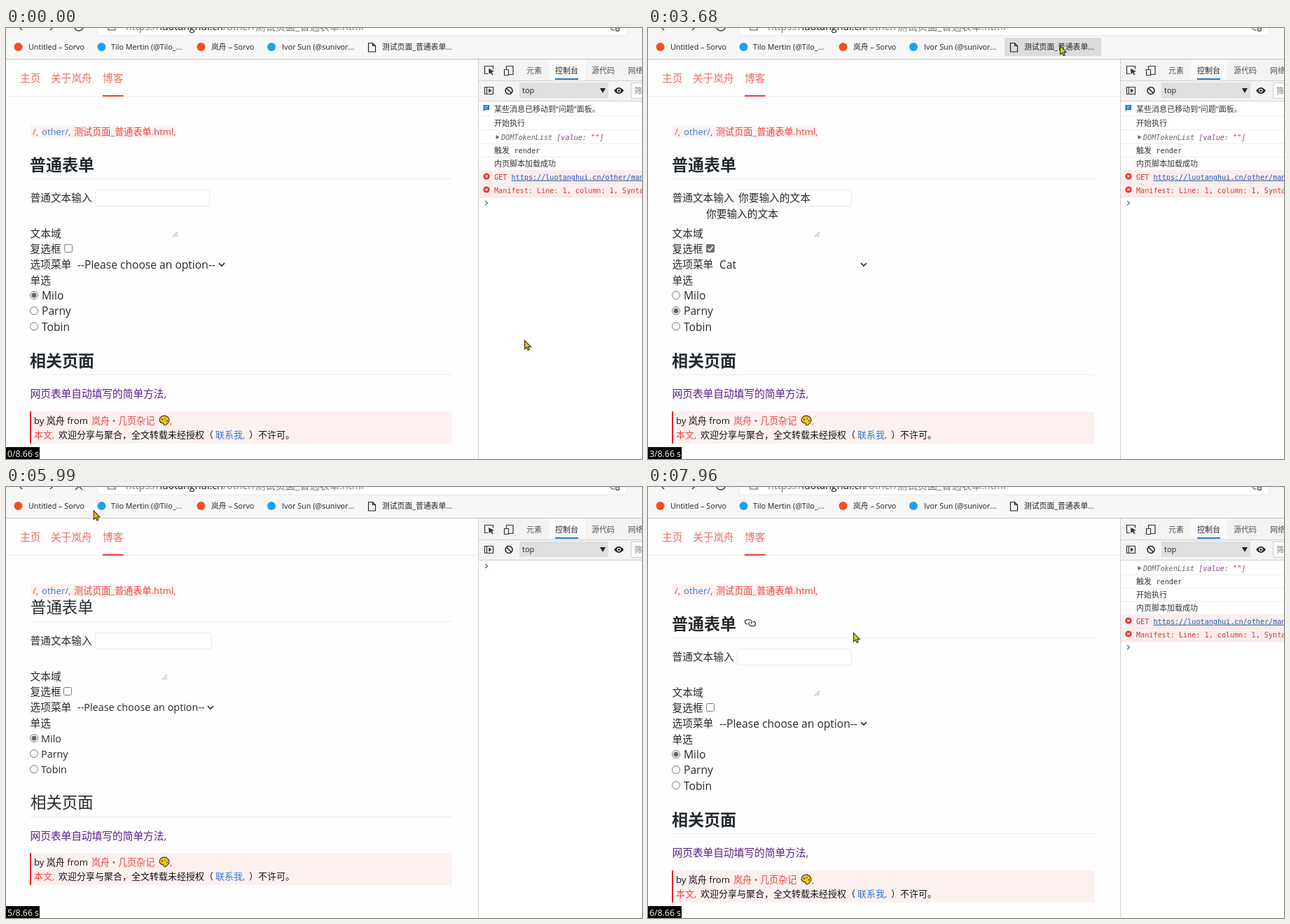
These frames come from a looping animation (908x616 px, 7.99 s). An HTML page:

```html
<!DOCTYPE html>
<html lang="zh-CN">
<head>
<meta charset="utf-8">
<title>表单自动填写</title>
<style>
html, body { margin: 0; width: 100%; height: 100%; overflow: hidden; background: #fff; }
svg { display: block; width: 908px; height: 616px; font-family: "Open Sans", "Noto Sans CJK SC", "Noto Sans CJK", sans-serif; }
text { white-space: pre; }
.mono { font-family: "DejaVu Sans Mono", "Noto Sans CJK SC", "Noto Sans CJK", monospace; }
</style>
</head>
<body>
<svg id="stage" viewBox="0 0 908 616" xmlns="http://www.w3.org/2000/svg"></svg>
<script>
const LOOP = 7990;
const INK = '#24292e', RED = '#e5463f', SOFT_RED = '#ec6c66', BLUE = '#2f7bd0', PURPLE = '#5a2188', RULE = '#eaecef';
const SITE = 'luotanghui.cn', AUTHOR = '岚舟';

// Shape helpers; text is placed by its vertical centre.
const text = (x, cy, size, fill, str, attrs = '') =>
  `<text x="${x}" y="${cy + size * 0.37}" font-size="${size}" fill="${fill}" ${attrs}>${str}</text>`;
const mono = (x, cy, fill, str, attrs = '') => text(x, cy, 10.15, fill, str, `class="mono" ${attrs}`);
const rect = (x, y, w, h, fill, attrs = '') =>
  `<rect x="${x}" y="${y}" width="${w}" height="${h}" fill="${fill}" ${attrs}/>`;
const circle = (x, y, r, fill, attrs = '') => `<circle cx="${x}" cy="${y}" r="${r}" fill="${fill}" ${attrs}/>`;
const line = (d, stroke, width = 1, attrs = '') =>
  `<path d="${d}" fill="none" stroke="${stroke}" stroke-width="${width}" ${attrs}/>`;
const group = (id, body, attrs = '') => `<g id="${id}" ${attrs}>${body}</g>`;

function browserBar() {
  const label = (x, str) => text(x, 27, 10.8, '#222', str);
  return rect(0, 0, 908, 44, '#f7f7f7') + line('M0 44.5H908', '#c4c4c4') +
    rect(130, -20, 757, 31, '#fff', 'rx="4" stroke="#e6e6e6"') +
    group('reloadHover', rect(86, -6, 37, 17, '#d9d9d9', 'rx="3"')) +
    group('tabHover', rect(509, 14, 138, 26, '#dcdcdc')) +
    line('M18 -2l5 5M63 3l5 -5', '#333', 1.3) +
    group('reloadIcon', line('M98 -1a6 5 0 0 0 12 0', '#333', 1.4)) +
    group('stopIcon', line('M99 4l5 -5l5 5', '#333', 1.3)) +
    line('M146 -2V3H156V-2', '#555', 1.2) +
    text(171, -2, 14.2, '#777', `https://<tspan fill="#111">${SITE}</tspan>/other/测试页面_普通表单.html`) +
    line('M863 0q2 4 6 3', '#666', 1.2) + circle(873, 2, 3.2, '#666') + line('M871 2h4M873 0v4', '#fff', 1) +
    circle(17.5, 27, 6, '#f24e1e') + label(32, 'Untitled – Sorvo') +
    circle(136.5, 27, 6, '#1da1f2') + label(150, 'Tilo Mertin (@Tilo_...') +
    circle(278.5, 27, 6, '#f24e1e') + label(293, `${AUTHOR} – Sorvo`) +
    circle(379, 27, 6, '#1da1f2') + label(394, 'Ivor Sun (@sunivor...') +
    line('M517.5 21.5h6l4 4v8.5h-10zM523.5 21.5v4h4', '#222', 1.2) + label(537, '测试页面_普通表单...');
}

function pageHeader() {
  const nav = (x, str) => text(x, 72, 14.7, SOFT_RED, str, 'font-weight="300"');
  return line('M0 97.5H674', '#eee') + nav(20, '主页') + nav(64, '关于' + AUTHOR) + nav(138, '博客') +
    rect(138, 96, 29.5, 2, '#e53b35') + rect(35, 139, 206, 18, '#fdf3f2') +
    text(38, 148, 13.1, RED, '/,') + text(51, 148, 13.1, BLUE, 'other/,') +
    text(97, 148, 13.1, RED, '测试页面_普通表单.html,');
}

const palette = (x, y) =>
  `<path d="M${x - 7} ${y}a7 6.5 0 1 1 10 5q-2 3 -4 0q0 -3 -3 -2z" fill="#f5c518" stroke="#2b2b2b" stroke-width="1.1"/>` +
  circle(x - 3, y - 2, 1, '#2b2b2b') + circle(x + 1, y - 3, 1, '#d33') + circle(x + 4, y, 1, '#2b2b2b');

function footer(y) {
  const a = y + 13.5, b = y + 33;
  return rect(34, y, 603, 46, '#fdf1f0') + rect(34, y, 2, 46, '#e0202a') +
    text(40, a, 13.1, '#111', `by ${AUTHOR} from`) + text(122, a, 13.1, RED, AUTHOR + ' • 几页杂记') +
    palette(226, a) + text(234, a, 13, RED, ',') +
    text(40, b, 13, RED, '本文,') + text(75, b, 13, '#111', '欢迎分享与聚合，全文转载未经授权（') +
    text(299, b, 13, BLUE, '联系我,') + text(347, b, 13, '#111', '）不许可。');
}

function radio(y, id) {
  return circle(40, y, 5.5, '#fff', 'stroke="#767676"') + group(id, circle(40, y, 3.5, '#686868'));
}

// Page body, either fully styled or as it looks before the style sheet arrives.
function pageBody(styled) {
  const dy = styled ? 0 : -23, latin = styled ? 15.6 : 14.4, key = styled ? 'S' : 'P';
  const label = (y, str) => text(34.5, y + dy, 14.7, INK, str);
  const heading = (y, str) => styled ? text(34, y, 23, INK, str, 'font-weight="700"')
    : text(35, y, 22.4, INK, str);
  const rule = y => line(`M34 ${y}H637`, RULE);
  const gap = styled ? 0 : -24;
  const boxX = styled ? 83.5 : 82.5, boxY = 309.5 + dy;
  const endX = styled ? 308 : 292, grip = styled ? 242 : 227;
  const choices = ['Milo', 'Parny', 'Tobin'].map((name, i) =>
    radio(382 + dy + i * 22.2, key + i) + text(styled ? 51 : 50, 382.5 + dy + i * 22.2, latin, INK, name)).join('');
  return heading(195 + dy, '普通表单') + rule(215.5 + dy) +
    label(243, '普通文本输入') + rect(127.5, 231.5 + dy, styled ? 163 : 166, 23, '#fff', 'rx="2" stroke="#e6eaef"') +
    label(293.5, '文本域') + line(`M${grip - 4} ${298.5 + dy}l7 -7m0 4l-3 3`, '#777', 0.9) +
    label(315.5, '复选框') + rect(boxX, boxY, 11, 11, '#fff', 'rx="2" stroke="#767676"') +
    label(338, '选项菜单') + group(key + 'Prompt', text(102, 338 + dy, latin, INK, '--Please choose an option--')) +
    line(`M${endX - 4} ${336 + dy}l4 4l4 -4`, '#222', 1.6) +
    label(360.5, '单选') + choices +
    heading(475 + gap, '相关页面') + rule(495.5 + gap) +
    text(34.5, 522.5 + gap, 14.7, PURPLE, '网页表单自动填写的简单方法,') + footer(styled ? 548 : 523);
}

function filledFields() {
  return text(129, 243, 14.7, INK, '你要输入的文本') + text(83, 266, 14.7, INK, '你要输入的文本') +
    rect(83, 309, 12, 12, '#707070', 'rx="2"') + line('M85.5 315l2.7 3l4.5 -6', '#fff', 1.6) +
    text(102, 338, 15.6, INK, 'Cat');
}

const anchorIcon = line('M142.5 196h-1.2a2.8 3.1 0 0 1 0 -6.2h4a2.8 3.1 0 0 1 1.6 5.6' +
  'M149.5 192.4h1.2a2.8 3.1 0 0 1 0 6.2h-4a2.8 3.1 0 0 1 -1.6 -5.6', INK, 1.1);

function devtoolsFrame() {
  const tab = (x, str, fill = '#555') => text(x, 61, 11, fill, str);
  return rect(674, 45, 234, 571, '#fff') + rect(674, 45, 234, 59, '#f3f3f3') +
    rect(775, 46, 52, 29, '#fafafa') + line('M674.5 45V616M674 75.5H908M674 104.5H908', '#cfcfcf') +
    line('M688 65.5h-4.5v-11h12v4', '#333', 1.2) + '<path d="M689 58l8 4l-3.5 1l2 3.5l-1.5 .8l-2 -3.4l-2.5 2z" fill="#333"/>' +
    line('M714.5 59v-4.5h9.5v12h-6M711.5 59.5h6v8h-6z', '#333', 1.2) +
    tab(743, '元素') + tab(784, '控制台', '#222') + tab(836, '源代码') + tab(888, '网络') +
    rect(784, 72, 33, 2, '#1a73c8') +
    line('M683.5 84.5h12v10h-12zM686.5 84.5v10', '#333', 1.2) + '<path d="M689 86.5l4.5 3l-4.5 3z" fill="#333"/>' +
    circle(718, 89.5, 5, 'none', 'stroke="#222" stroke-width="1.5"') + line('M714.5 86l7 7', '#222', 1.5) +
    rect(733, 78, 127, 22, '#dfdfdf') + text(737, 89, 11, '#222', 'top') +
    '<path d="M848 86h8l-4 7z" fill="#222"/>' +
    '<path d="M868 89.5q7 -9 14 0q-7 9 -14 0z" fill="#222"/>' +
    circle(875, 89.5, 2.8, '#f3f3f3') + circle(875, 89.5, 1.5, '#222') +
    rect(892.5, 78.5, 30, 22, '#fff', 'stroke="#ccc"') + text(897, 89.5, 11, '#777', '筛');
}

const arrow = y => `<path d="M699.5 ${y - 3}l5 3l-5 3z" fill="#666"/>`;
const plain = str => y => text(697, y, 11, '#333', str, 'class="mono"');
const failure = body => y => rect(675, y - 9.5, 233, 19, '#fdeeee') +
  circle(686, y - 1, 4.6, '#e0362f') + line(`M684.3 ${y - 2.7}l3.4 3.4m0 -3.4l-3.4 3.4`, '#fff', 1.1) + body(y);

const ROWS = {
  notice: y => '<path d="M681.5 ' + (y - 6) + 'h8.5v7h-6l-2.5 2.5z" fill="#1a78d0"/>' +
    line(`M683.5 ${y - 3.7}h4.5m-4.5 2.2h3`, '#fff', 0.8) + text(697, y, 11, '#333', '某些消息已移动到“问题”面板。'),
  start: plain('开始执行'),
  tokens: y => arrow(y) + mono(707, y, '#666',
    'DOMTokenList [<tspan fill="#8a3a8a">value</tspan>: <tspan fill="#a03030">""</tspan>]', 'font-style="italic"'),
  render: y => text(697, y, 11, '#333', '触发', 'class="mono"') + mono(725.5, y, '#333', 'render'),
  loaded: plain('内页脚本加载成功'),
  get: failure(y => mono(697, y, '#d8322c', 'GET') +
    mono(721.5, y, '#2456b0', `https://${SITE}/other/manifest`, 'text-decoration="underline"')),
  manifest: failure(y => mono(697, y, '#d8322c', 'Manifest: Line: 1, column: 1, Syntax error.')),
  request: y => mono(697, y, '#333', '[<tspan font-size="11">请求地址</tspan>]') + arrow(y + 20) +
    mono(707.5, y + 14, '#666', `{<tspan fill="#8a3a8a">host</tspan>: <tspan fill="#333">"${SITE}"</tspan>, <tspan fill="#8a3a8a">path</tspan>: "/%E6"`, 'font-style="italic"') +
    mono(707.5, y + 27, '#666', '<tspan fill="#8a3a8a">s</tspan>: {…}}', 'font-style="italic"')
};

const FIRST = [['notice', 116], ['start', 136], ['tokens', 156], ['render', 175], ['loaded', 194], ['get', 213], ['manifest', 232]];
const SECOND = [['tokens', 116], ['render', 135], ['start', 154], ['loaded', 173], ['get', 192], ['manifest', 211]];

// Console contents by time: [from, rows, y of the prompt]
const CONSOLE = [
  [0, FIRST, 250],
  [4250, [...FIRST, ['request', 251]], 295],
  [5900, [], 113],
  [6370, SECOND.slice(0, 1), 134],
  [6540, SECOND.slice(0, 2), 153],
  [6800, SECOND.slice(0, 4), 191],
  [7600, SECOND, 229]
];

function consoleView(rows, promptY) {
  const body = rows.map(([kind, y]) => {
    const bottom = y + (kind === 'request' ? 35.5 : 9.5);
    const edge = kind === 'get' || kind === 'manifest' ? '#f8d9d9' : '#ededed';
    return ROWS[kind](y) + line(`M675 ${bottom}H908`, edge);
  }).join('');
  return body + line(`M684 ${promptY - 3}l3.5 3l-3.5 3`, '#3577d4', 1.4);
}

const POINTERS = {
  arrow: '<path d="M.5 .5V13L3.3 10.4L5.3 14.6L7.3 13.7L5.4 9.6H9.3Z" stroke="#333" stroke-width="1.1"/>',
  hand: '<path d="M4 9V1.5q1.2 -1.5 2.4 0V6l5 1.3v4.2l-1.2 4H4.5L.8 10.5l1 -2z" stroke="#333" stroke-width="1.2"/>' +
    line('M8 7v2.5M10 7.5v2', '#333', 0.8),
  beam: line('M0 1.2h7M3.5 1v12.5M0 13.3h7', '#333', 2.8) + line('M1 1.2h5M3.5 1v12.5M1 13.3h5', '#d9a400', 1)
};

const stage = document.getElementById('stage');
stage.innerHTML = rect(0, 0, 908, 616, '#fefefe') + pageHeader() +
  group('styled', pageBody(true) + group('filled', filledFields()) + group('anchor', anchorIcon)) +
  group('bare', pageBody(false)) + devtoolsFrame() +
  CONSOLE.map(([, rows, y], i) => group('console' + i, consoleView(rows, y))).join('') + browserBar() +
  rect(0, 599, 48, 17, '#000') + '<text id="clock" x="2" y="613" font-size="12.3" fill="#fff"></text>' +
  group('pointer', Object.entries(POINTERS).map(([id, shape]) => group(id, shape)).join(''));

const byId = id => document.getElementById(id);
const show = (id, on) => { byId(id).style.display = on ? '' : 'none'; };

// Pointer path: [time, x, y]
const PATH = [
  [0, 740, 446], [580, 740, 446], [1370, 587, 43], [1420, 587, 38], [1630, 588, 25], [4000, 588, 25],
  [4770, 102, 2], [4890, 101, 0], [5350, 101, 0], [5530, 102, 2], [5690, 102, 2], [6280, 146, 63],
  [6510, 146, 64], [7230, 58, 232], [7360, 69, 240], [7650, 190, 312], [7960, 293, 208], [LOOP, 293, 208]
];
const TICKS = [1150, 2130, 2880, 4030, 5180, 6600];

function pointerAt(t) {
  const i = Math.max(1, PATH.findIndex(p => p[0] > t));
  const [t0, x0, y0] = PATH[i - 1], [t1, x1, y1] = PATH[i];
  const u = (t - t0) / (t1 - t0), e = u * u * (3 - 2 * u);
  return [x0 + (x1 - x0) * e, y0 + (y1 - y0) * e];
}

function render(t) {
  const [x, y] = pointerAt(t);
  const filled = t >= 2230 && t < 5900;
  const bare = t >= 5900 && t < 6560;
  show('styled', !bare);
  show('bare', bare);
  show('filled', filled);
  show('SPrompt', !filled);
  show('S0', !filled);
  show('S1', filled);
  for (const id of ['S2', 'P1', 'P2']) show(id, false);
  show('anchor', t > 7700 && y < 216);

  const current = CONSOLE.filter(c => c[0] <= t).length - 1;
  CONSOLE.forEach((_, i) => show('console' + i, i === current));

  show('tabHover', y < 40 && x > 509 && x < 647);
  show('reloadHover', y < 11 && x > 86 && x < 123);
  show('stopIcon', t >= 5750 && t < 6900);
  show('reloadIcon', t < 5750 || t >= 6900);
  byId('clock').textContent = TICKS.filter(s => s <= t).length + '/8.66 s';

  const kind = t >= 6240 && t < 6580 ? 'hand' : t >= 7080 && t < 7400 ? 'beam' : 'arrow';
  for (const id in POINTERS) show(id, id === kind);
  const pointer = byId('pointer');
  pointer.setAttribute('transform', `translate(${x.toFixed(1)} ${y.toFixed(1)})`);
  pointer.setAttribute('fill', t < 250 || (t > 5600 && t < 7360) ? '#ecc00c' : '#cfe000');
}

const began = performance.now();
function tick() {
  render((performance.now() - began) % LOOP);
  requestAnimationFrame(tick);
}
tick();
</script>
</body>
</html>
```
